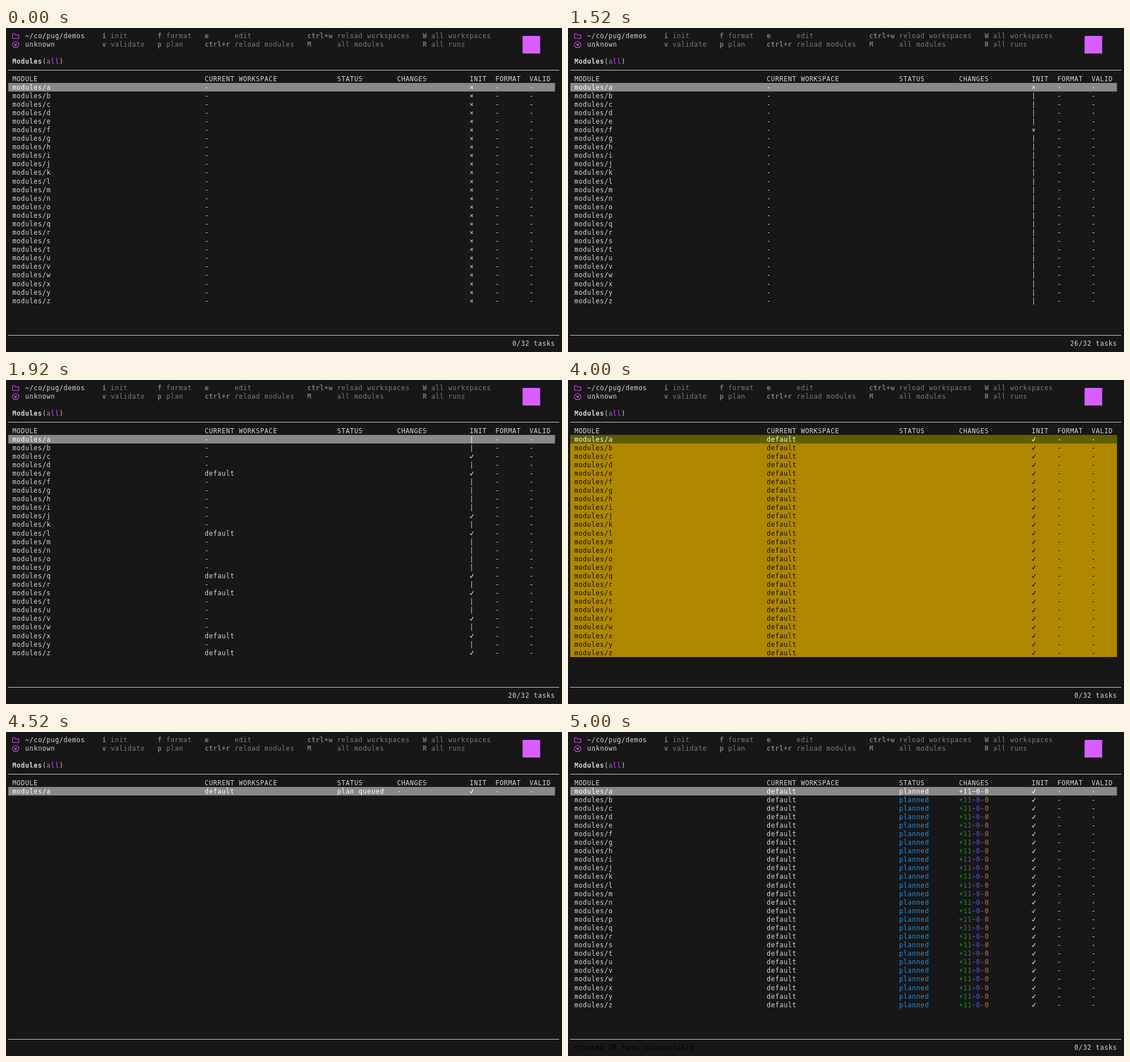
Write an HTML page that moves like this. It is 980 px wide and 572 px high and loops after 8 s.

```html
<!DOCTYPE html>
<html lang="en">
<head>
<meta charset="utf-8">
<title>Modules</title>
<style>
html, body { margin: 0; width: 980px; height: 572px; overflow: hidden; background: #171717; }
svg { display: block; }
text { font: 11.45px "DejaVu Sans Mono", "Noto Sans Mono", monospace; letter-spacing: .64px; white-space: pre; }
.b { font-weight: bold; }
</style>
</head>
<body>
<svg id="stage" width="980" height="572" viewBox="0 0 980 572">
  <rect width="980" height="572" fill="#171717"/>
  <g id="head"></g>
  <g id="table"></g>
  <g id="foot"></g>
</svg>
<script>
const LOOP = 8000, TICK = 40, ROWS = 26;
const X0 = 3.4, Y0 = 6.5, CW = 7.533, RH = 15.08;
const FG = "#d8d8d8", WHITE = "#ffffff", GREY = "#7b7b7b", PURPLE = "#d75fff";
const COL = { module: 1, space: 46, status: 77, changes: 91, init: 108, format: 114, valid: 122 };
const $ = id => document.getElementById(id);

const colX = c => X0 + c * CW;
const rowY = r => Y0 + r * RH;
const put = (c, r, s, fill = FG, cls = "") =>
  `<text x="${(colX(c) + .3).toFixed(2)}" y="${(rowY(r) + 11.7).toFixed(2)}" fill="${fill}" class="${cls}">${s}</text>`;
const bar = (r, fill) =>
  `<rect x="4" y="${rowY(r).toFixed(2)}" width="963.6" height="${RH + .05}" fill="${fill}"/>`;
const rule = y => `<rect x="4" y="${y}" width="971" height="1" fill="#cfcfcf"/>`;
const tick = (c, r, color) =>
  `<path d="M${colX(c) + .9} ${rowY(r) + 8.2}l2 2.4l3.9-6.2" fill="none" stroke="${color}" stroke-width="1.2"/>`;

function drawHead() {
  const help = [
    [22, 24, "i", "init", "v", "validate"],
    [35, 37, "f", "format", "p", "plan"],
    [46, 53, "e", "edit", "ctrl+r", "reload modules"],
    [70, 77, "ctrl+w", "reload workspaces", "M", "all modules"],
    [97, 99, "W", "all workspaces", "R", "all runs"]
  ];
  let s = `<g fill="none" stroke="#c455ec" stroke-width="1.1">
    <path d="M11.5 10.3h4l1.5 1.7h5.5v6.5h-11z"/>
    <circle cx="17" cy="29.3" r="5.6"/><path d="M14.8 27l2.2 4.8l2.2-4.8" stroke-width="1.5"/></g>`;
  s += put(4, 0, "~/co/pug/demos") + put(4, 1, "unknown");
  for (const [k, d, k1, d1, k2, d2] of help) {
    s += put(k, 0, k1, GREY, "b") + put(d, 0, d1, GREY);
    s += put(k, 1, k2, GREY, "b") + put(d, 1, d2, GREY);
  }
  s += `<rect x="910.5" y="14" width="31" height="31" fill="${PURPLE}"/>`;
  s += put(1, 3, "Modules", FG, "b") + put(8, 3, "(") + put(9, 3, "all", "#c455ec") + put(12, 3, ")");
  s += rule(74) + rule(542);
  const titles = { module: "MODULE", space: "CURRENT WORKSPACE", status: "STATUS",
    changes: "CHANGES", init: "INIT", format: "FORMAT", valid: "VALID" };
  for (const k in titles) s += put(COL[k], 5, titles[k]);
  $("head").innerHTML = s;
}

// Tasks finish in a scattered but fixed order.
const rank = i => (i * 11 + 11) % ROWS;
const spaceAt = i => Math.ceil((1800 + rank(i) / 25 * 560) / TICK) * TICK;
const initAt = i => spaceAt(i) - 80;
const planAt = i => 4880 + Math.floor(rank(i) / 6.5) * TICK;

function initCell(i, r, t, color) {
  if (t >= initAt(i)) return tick(COL.init, r, color);
  const waiting = t < 1520 || (t < 1560 && (i === 0 || i === 5));
  const mark = waiting ? "×" : "|/-\\"[Math.floor((t - 1520) / 100) % 4];
  return put(COL.init, r, mark, color);
}

function planCells(i, r, t, color) {
  const current = i === 0, tint = c => current ? color : c;
  if (t < 4520) return "";
  if (t < planAt(i)) {
    const label = t < 4560 ? "plan queued" : "planning";
    return put(COL.status, r, label, tint("#4b8fe0")) + put(COL.changes, r, "-", color);
  }
  return put(COL.status, r, "planned", tint("#1e96e6")) +
    put(COL.changes, r, "+11", tint("#149a1c")) +
    put(COL.changes + 3, r, "~0", tint("#5a50e6")) +
    put(COL.changes + 5, r, "-0", tint("#de6a3c"));
}

function drawTable(t) {
  const picked = (t >= 1000 && t < 1520) || (t >= 4000 && t < 4520);
  const shown = t >= 4520 && t < 4560 ? 1 : ROWS;
  let s = "";
  if (picked) s += `<rect x="4" y="${rowY(6)}" width="963.6" height="${ROWS * RH}" fill="#af8700"/>`;
  s += bar(6, picked ? "#5f5f00" : "#888888");
  for (let i = 0; i < shown; i++) {
    const r = 6 + i, color = i === 0 ? WHITE : picked ? "#0c0c0c" : FG;
    s += put(COL.module, r, "modules/" + String.fromCharCode(97 + i), color);
    s += put(COL.space, r, t >= spaceAt(i) ? "default" : "-", color);
    s += planCells(i, r, t, color) + initCell(i, r, t, color);
    s += put(COL.format, r, "-", color) + put(COL.valid, r, "-", color);
  }
  $("table").innerHTML = s;
}

function drawFoot(t) {
  const rows = [...Array(ROWS).keys()];
  const endAt = t >= 4560 ? planAt : spaceAt;
  const busy = t < 1520 ? 0 : rows.filter(i => t < endAt(i)).length;
  const count = busy + "/32 tasks";
  let s = "", note = "";
  if (t >= 2320 && t < 4000)
    note = "completed init tasks: (26 successful; 0 errored; 0 canceled; 0 uncreated)";
  if (t >= 4560) note = "created 26 runs successfully";
  if (note) s += put(1, 36, note, "#000000");
  if (t < 4520 || t >= 4560) s += put(128 - count.length, 36, count);
  $("foot").innerHTML = s;
}

let last = -1;
function frame(now) {
  const t = Math.floor((now % LOOP) / TICK) * TICK;
  if (t !== last) {
    last = t;
    drawTable(t);
    drawFoot(t);
  }
  requestAnimationFrame(frame);
}

drawHead();
const start = performance.now();
const run = () => frame(Math.max(0, performance.now() - start));
frame = (draw => () => {
  draw(Math.max(0, performance.now() - start));
})(frame);
run();
</script>
</body>
</html>
```
